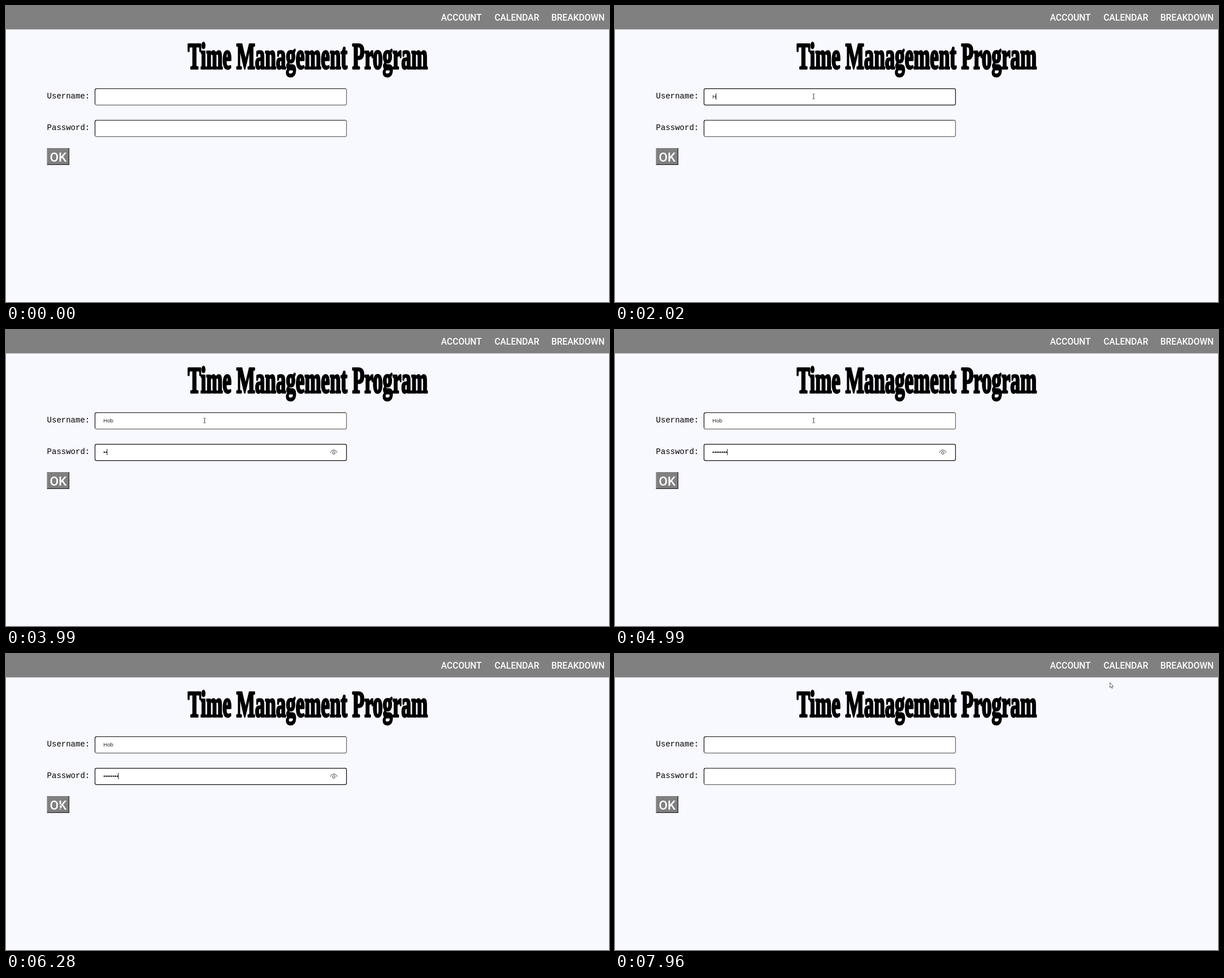
Animation, 1067 px wide and 525 px high, one loop 8000 ms. Source, as an HTML page with a canvas:

```html
<!DOCTYPE html>
<html lang="en">
<head>
<meta charset="utf-8">
<title>Time Management Program</title>
<style>
  html, body { margin: 0; width: 100%; height: 100%; overflow: hidden; background: #f8f8ff; }
  canvas { display: block; }
</style>
</head>
<body>
<canvas id="stage" width="1067" height="525"></canvas>
<script>
const ctx = document.getElementById('stage').getContext('2d');
const LOOP = 8000;
const USER = 'Hob';
const FIELD = { x: 157.5, w: 445, h: 29 };
const USER_Y = 146.5, PASS_Y = 202.5;
const TEXT_X = 172.3;
const INPUT_FONT = '9.5px "Liberation Sans", Arial, sans-serif';

// Moments at which each character is typed.
const USER_KEYS = [2020, 2480, 2610];
const PASS_KEYS = [3865, 3990, 4190, 4320, 4590, 4720, 4790, 4990];
const FOCUS_USER = 1480, FOCUS_PASS = 3270, PRESS = 6480, SUBMIT = 6610;

// Pointer legs: start time, step length, step count, destination.
const START = { x: 798.5, y: 588.5 };
const LEGS = [
  { at: 390, step: 65, steps: 3, x: 530.5, y: 338.5 },
  { at: 790, step: 70, steps: 6, x: 364, y: 185 },
  { at: 1210, step: 70, steps: 3, x: 351.5, y: 160.5 },
  { at: 5520, step: 76, steps: 11, x: 95, y: 266 },
  { at: 7080, step: 70, steps: 3, x: 630, y: 154.5 },
  { at: 7550, step: 68, steps: 7, x: 875.8, y: 50.7 }
];

const smooth = p => p * p * (3 - 2 * p);
const typed = (keys, t) => keys.filter(k => t >= k).length;

function pointerAt(t) {
  let { x, y } = START;
  for (const leg of LEGS) {
    if (t < leg.at) break;
    const done = Math.min(1, (Math.floor((t - leg.at) / leg.step) + 1) / leg.steps);
    const p = leg.steps > 3 ? smooth(done) : done;
    x += (leg.x - x) * p;
    y += (leg.y - y) * p;
  }
  return { x, y };
}

function text(str, x, y, font, color, align = 'left') {
  ctx.font = font;
  ctx.fillStyle = color;
  ctx.textAlign = align;
  ctx.fillText(str, x, y);
}

function line(points, color, width) {
  ctx.beginPath();
  points.forEach(([x, y]) => ctx.lineTo(x, y));
  ctx.strokeStyle = color;
  ctx.lineWidth = width;
  ctx.stroke();
}

function drawHeader() {
  ctx.fillStyle = '#808080';
  ctx.fillRect(0, 0, 1067, 41.5);
  const font = '500 15.6px Roboto, "Open Sans", sans-serif';
  text('ACCOUNT', 769.8, 26.2, font, '#fff');
  text('CALENDAR', 864.4, 26.2, font, '#fff');
  text('BREAKDOWN', 965, 26.2, font, '#fff');
}

function drawTitle() {
  ctx.save();
  ctx.translate(534, 111.2);
  ctx.scale(1, 1.85); // tall display lettering
  text('Time Management Program', 0, 0, 'bold 35px "Liberation Serif", "Times New Roman", serif', '#000', 'center');
  ctx.strokeStyle = '#000';
  ctx.lineWidth = 1.9;
  ctx.lineJoin = 'round';
  ctx.strokeText('Time Management Program', 0, 0);
  ctx.restore();
}

function drawField(label, y, focused) {
  const { x, w, h } = FIELD;
  text(label, 72.6, y + 17.5, '14px "Liberation Mono", "Courier New", monospace', '#000');
  ctx.beginPath();
  ctx.roundRect(x, y, w, h, 2.5);
  ctx.fillStyle = '#fff';
  ctx.fill();
  ctx.strokeStyle = focused ? '#111' : '#6a6a6a';
  ctx.lineWidth = 1.25;
  ctx.stroke();
  if (!focused) line([[x, y + h - 2], [x, y + 2], [x + 2, y], [x + w - 2, y]], '#262626', 1.2);
}

function drawCaret(x, y) {
  ctx.fillStyle = '#000';
  ctx.fillRect(Math.round(x) - 0.6, y + 8.5, 0.9, 11);
}

function drawEye() {
  ctx.beginPath();
  ctx.moveTo(574.3, 217.6);
  ctx.bezierCurveTo(576, 211.2, 584, 211.2, 585.7, 217.6);
  ctx.moveTo(582.3, 218);
  ctx.arc(580, 218, 2.3, 0, Math.PI * 2);
  ctx.strokeStyle = '#333';
  ctx.lineWidth = 1;
  ctx.stroke();
}

function drawButton(pressed) {
  const dark = '#2b2b2b', shift = pressed ? 0.7 : 0;
  ctx.fillStyle = '#808080';
  ctx.fillRect(72.5, 252, 39.5, 30);
  line(pressed
    ? [[73, 282], [73, 252.5], [112, 252.5]]
    : [[72.7, 281.4], [111.4, 281.4], [111.4, 252]], dark, 1.3);
  text('OK', 92.3 + shift, 275.8 + shift, '500 22.5px Roboto, "Open Sans", sans-serif', '#fff', 'center');
}

function drawPointer({ x, y }) {
  const overField = x > FIELD.x && x < FIELD.x + FIELD.w &&
    [USER_Y, PASS_Y].some(top => y > top && y < top + FIELD.h);
  ctx.save();
  ctx.translate(x, y);
  if (overField) {
    line([[0, -4], [0, 4]], '#444', 1);
    line([[-2.3, -4.2], [2.3, -4.2]], '#555', 0.8);
    line([[-2.3, 4.2], [2.3, 4.2]], '#555', 0.8);
  } else {
    ctx.beginPath();
    [[0, 0], [0, 9], [2.1, 7.2], [3.4, 10.2], [4.8, 9.6], [3.5, 6.7], [6, 6.5]]
      .forEach(([px, py]) => ctx.lineTo(px, py));
    ctx.closePath();
    ctx.fillStyle = '#fff';
    ctx.fill();
    ctx.strokeStyle = '#3a3a3a';
    ctx.lineWidth = 0.8;
    ctx.stroke();
  }
  ctx.restore();
}

function caretVisible(t) {
  if (t < FOCUS_USER || t >= PRESS) return false;
  const events = [FOCUS_USER, FOCUS_PASS, ...USER_KEYS, ...PASS_KEYS];
  const last = Math.max(...events.filter(e => e <= t));
  return Math.floor((t - last) / 530) % 2 === 0;
}

function drawEntries(t) {
  if (t >= SUBMIT) return;
  const name = USER.slice(0, typed(USER_KEYS, t));
  const dots = '•'.repeat(typed(PASS_KEYS, t));
  text(name, TEXT_X, USER_Y + 17.2, INPUT_FONT, '#222');
  text(dots, TEXT_X, PASS_Y + 17.1, INPUT_FONT, '#000');
  if (dots) drawEye();
  if (caretVisible(t)) {
    const inPassword = t >= FOCUS_PASS;
    const width = ctx.measureText(inPassword ? dots : name).width;
    drawCaret(TEXT_X + width, inPassword ? PASS_Y : USER_Y);
  }
}

function draw(t) {
  ctx.fillStyle = '#f8f8ff';
  ctx.fillRect(0, 0, 1067, 525);
  drawHeader();
  drawTitle();
  drawField('Username:', USER_Y, t >= FOCUS_USER && t < FOCUS_PASS);
  drawField('Password:', PASS_Y, t >= FOCUS_PASS && t < SUBMIT);
  drawEntries(t);
  drawButton(t >= PRESS && t < SUBMIT);
  drawPointer(pointerAt(t));
}

const began = performance.now();
function tick() {
  draw((performance.now() - began) % LOOP);
  requestAnimationFrame(tick);
}
tick();
</script>
</body>
</html>
```
